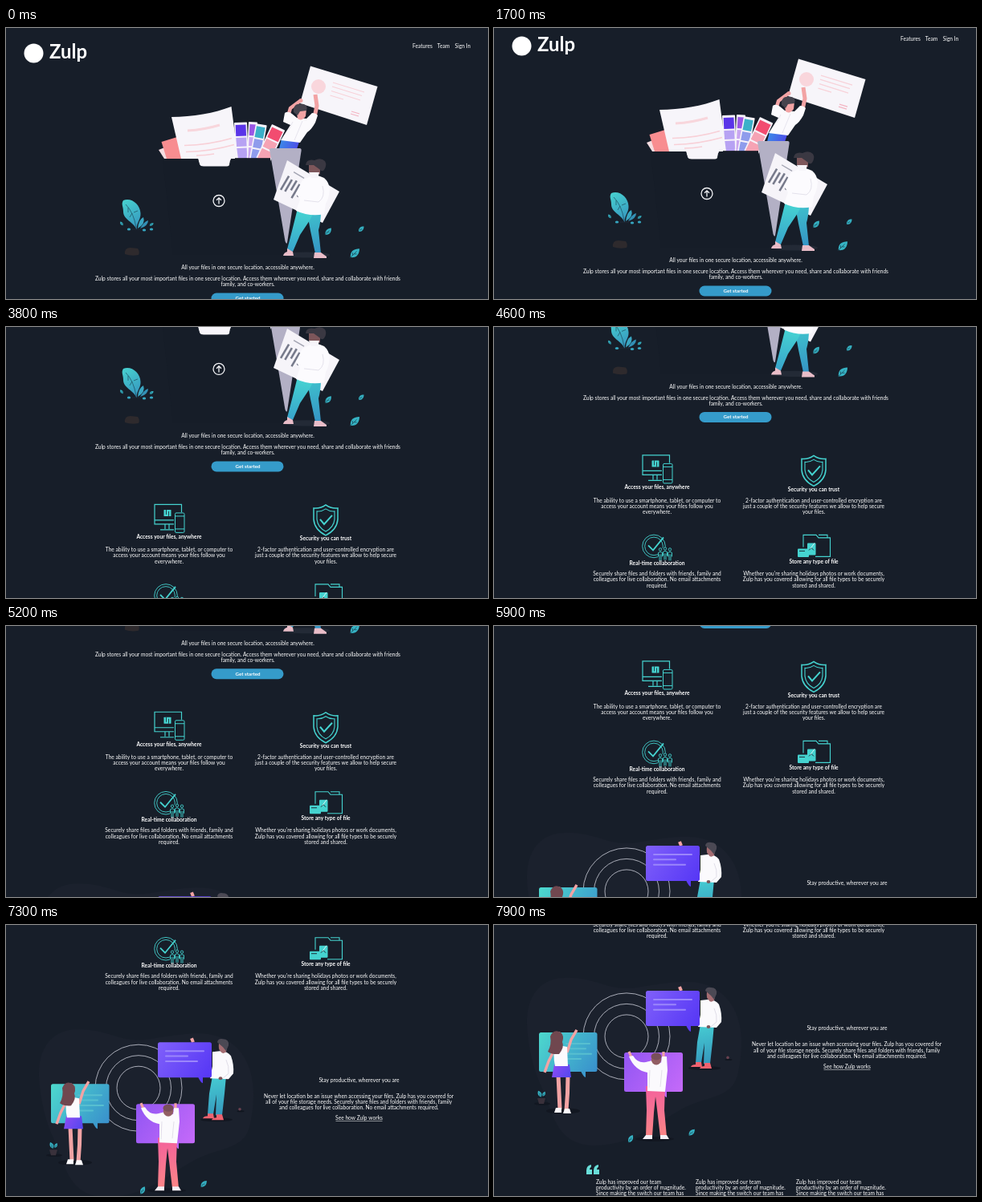
An HTML page with a canvas for the animation above (8 s loop, 600 px wide and 338 px high).

```html
<!DOCTYPE html>
<html lang="en">
<head>
<meta charset="utf-8">
<title>Zulp</title>
<style>
html, body { margin: 0; width: 100%; height: 100%; overflow: hidden; background: #171e29; }
canvas { display: block; width: 600px; height: 338px; }
</style>
</head>
<body>
<canvas id="stage" width="600" height="338"></canvas>
<script>
const ctx = document.getElementById('stage').getContext('2d');
const LOOP = 8000;
const BG = '#171e29', TEAL = '#45d3d0', SKIN = '#f2a3a4', BROWN = '#7d565a', WHITE = '#fff';

// Scroll keys: time, offset
const KEYS = [[0, 0], [1100, 0], [2000, 17], [2700, 51], [3800, 163], [4600, 224.5],
  [5900, 340.5], [6800, 417.5], [7900, 532.5], [8000, 543]];
const slope = i => (KEYS[i + 1][1] - KEYS[i][1]) / (KEYS[i + 1][0] - KEYS[i][0]);
const tangent = i => {
  if (i === 0) return 0;
  if (i === KEYS.length - 1) return slope(i - 1);
  const a = slope(i - 1), b = slope(i);
  return a * b > 0 ? 2 * a * b / (a + b) : 0;
};

function scrollAt(t) {
  let i = 0;
  while (i < KEYS.length - 2 && t >= KEYS[i + 1][0]) i++;
  const [t0, y0] = KEYS[i], [t1, y1] = KEYS[i + 1];
  const h = t1 - t0, u = (t - t0) / h, v = 1 - u;
  return y0 * (1 + 2 * u) * v * v + y1 * u * u * (3 - 2 * u) +
    h * u * v * (tangent(i) * v - tangent(i + 1) * u);
}

function fill(d, color) {
  ctx.fillStyle = color;
  ctx.fill(new Path2D(d));
}

function stroke(d, color, width = 1) {
  ctx.strokeStyle = color;
  ctx.lineWidth = width;
  ctx.stroke(new Path2D(d));
}

function oval(x, y, rx, ry, color, turn = 0) {
  ctx.beginPath();
  ctx.ellipse(x, y, rx, ry, turn, 0, 7);
  ctx.fillStyle = color;
  ctx.fill();
}

function ring(x, y, r, color, width) {
  ctx.beginPath();
  ctx.arc(x, y, r, 0, 7);
  ctx.strokeStyle = color;
  ctx.lineWidth = width;
  ctx.stroke();
}

function box(x, y, w, h, r, color) {
  ctx.beginPath();
  ctx.roundRect(x, y, w, h, r);
  ctx.fillStyle = color;
  ctx.fill();
}

function blend(x0, y0, x1, y1, ...colors) {
  const g = ctx.createLinearGradient(x0, y0, x1, y1);
  colors.forEach((c, i) => g.addColorStop(i / (colors.length - 1), c));
  return g;
}

// Set large and scaled down so that glyph advances keep their fractions
function text(str, x, y, { size = 6.64, weight = 400, align = 'center' } = {}) {
  ctx.save();
  ctx.translate(x, y);
  ctx.scale(0.1, 0.1);
  ctx.font = `${weight} ${size * 10}px Lato, "Open Sans", sans-serif`;
  ctx.textAlign = align;
  ctx.textBaseline = 'alphabetic';
  ctx.fillStyle = WHITE;
  ctx.fillText(str, 0, 0);
  ctx.restore();
}

function lines(rows, x, y, opts) {
  rows.forEach((row, i) => text(row, x, y + i * 7.2, opts));
}

function at(x, y, turn, draw) {
  ctx.save();
  ctx.translate(x, y);
  ctx.rotate(turn);
  draw();
  ctx.restore();
}

function leaf(x, y, size, turn) {
  at(x, y, turn, () => {
    ctx.scale(size, size);
    fill('M0 6C-5 2-4-3 0-7C4-3 5 2 0 6Z', '#36b3c4');
    stroke('M0 7V-3M0 3L-2 1M0 1L2-1', '#1a4656', 0.6);
  });
}

function header() {
  oval(34.5, 31.5, 12, 12, WHITE);
  text('Zulp', 54, 37.5, { size: 24, weight: 700, align: 'left' });
  [['Features', 518.5], ['Team', 544.5], ['Sign In', 568.5]].forEach(([s, x]) =>
    text(s, x, 25));
}

function swatch(x, y, turn, w, h, dark, pale) {
  at(x, y, turn, () => {
    box(0, 0, w, h, 0.8, '#f7f3fa');
    box(1.6, 3, w - 3.2, 14, 0, dark);
    box(1.6, 19, w - 3.2, 11, 0, pale);
    box(1.6, 32, w - 3.2, h - 32, 0, pale);
  });
}

function papers() {
  fill('M190 152L200 148L216 163H197Z', '#f5dde1');
  fill('M193.500 142L213 136L221 163H200Z', '#f88d90');
  swatch(284, 118, -0.04, 16, 45, '#5a34e8', '#b7a2f3');
  swatch(302, 117, 0.05, 11, 46, '#9a57e6', '#c9a6f0');
  swatch(311, 119, 0.18, 14, 45, '#3bb0c9', '#8f9cec');
  swatch(331, 120, 0.44, 18, 46, '#f24c70', '#f6a3b4');
  fill('M206 111C232 111 260 106 280.500 98L289 163L279 165L278 172Q277 173.500 275 173.500H246Q242 173.500 241 171L239 163H218Z', '#f7f5fa');
  stroke('M226 128Q246 127 266 121', '#f8d6dc', 3.2);
  stroke('M222 146.500Q252 146 281 137.500M224 154.500Q254 154 284 145.500M237 159Q248 159 259 157', '#f8d0d7', 1.5);
}

function folder() {
  fill('M195 163H239L241 170Q242 172.500 246 172.500H275Q278 172.500 278.500 169L280 163H329L348 270L347 283H208Z', '#161d28');
  stroke('M285 162.500H329', '#0f141c', 0.8);
  fill('M328 151.500Q328 150 330 150H365.500Q368 150 367.600 153L350 268Q349 270 347.500 266Z', '#b3b0c5');
  ring(265, 215.5, 7, '#f3f4f7', 1.3);
  stroke('M265 219.500V212M262 214.800L265 211.800L268 214.800', '#f3f4f7', 1.3);
}

function certificate() {
  fill('M379 47.500L462.500 73L449 121L366 94Z', '#f7f5fa');
  oval(389, 73, 9, 9, '#f9d6dc');
  stroke('M407 68L446 80M406 73L443 84.500M405 78.500L441 90M403.500 84L420 89', '#f8d2d9', 1.3);
  stroke('M430 104L440 107M429 107L439 110', '#f3b4c2', 1.3);
}

function climber() {
  ctx.lineJoin = 'round';
  stroke('M350 114L354 100L366 91', SKIN, 4.5);
  stroke('M384 111L387 97L385 83', SKIN, 5);
  oval(367, 90.5, 2.5, 2.5, SKIN);
  fill('M343 138L365 142L362 151H340Z', blend(340, 140, 365, 150, '#3a8ee8', '#4f49e8'));
  fill('M347 106Q351 103 356 107L362 112L374 113L381 106Q386 106 388 109L385 118Q380 127 375 130L366 143L342 140L354 121L345 117Z', '#fbfafd');
  stroke('M369 116L359 140M357 117L352 127', '#d9d6e3', 0.6);
  fill('M361 101H374L373 110Q368 117 363 113Z', SKIN);
  fill('M358 105C357 97 362 94 367 95C373 94 376 98 374 103L366 104L363 109Z', '#46444e');
  ctx.lineJoin = 'miter';
}

function carrier() {
  oval(374, 283, 29, 3.6, '#232a36');
  fill('M350 165L415 204L394 243L333 214Z', '#f6f4f9');
  at(351, 184, 0.53, () => {
    for (let i = 0; i < 5; i++) box(i * 5.6, i % 2 * 2, 2.6, 20 - i % 3 * 3, 0, '#777a8b');
    box(4, -8, 15, 1.4, 0, '#a2a3b1');
  });
  fill('M374 226L392 228Q392 242 389 252L392 281H385L379 253Z', blend(380, 226, 390, 282, '#3fc3cd', '#3593c4'));
  fill('M363 225L384 228L378 240L366 258L357 279L350 276L356 253Z', blend(360, 226, 352, 280, '#46d3d2', '#37a3cb'));
  fill('M350 275L357 279L358 284H345Q346 280 350 279Z', '#e9bdc8');
  fill('M384 280H392L399 285V287H383Z', '#e9bdc8');
  fill('M379 185Q385 182 391 185L396 187Q402 192 403 201Q402 213 398 219L396 232Q379 236 361 228L366 214L361 206L369 190Z', '#fcfbfe');
  stroke('M394 197Q398 211 389 217L371 215', '#dedbe6', 0.8);
  fill('M377 170L391 168L391 182Q384 187 377 180Z', BROWN);
  fill('M373 171Q374 163 384 165Q392 161 397 166Q400 171 396 177Q393 180 390 176L383 171Z', '#3a3842');
  fill('M377 180L390 180L388 187L380 187Z', '#f7f5fa');
}

function plants() {
  oval(163, 251, 12, 1, '#1c2430');
  fill('M146 215C156 211 167 220 167.500 231C168 239 163 241 162.500 251C159 242 146 239 146 229C146 222 143 220 146 215Z', blend(145, 215, 168, 250, '#48d2d0', '#3491bd'));
  stroke('M149 220Q159 230 162 249M152 224L152 230M157 231L154 236M159 230L164 228', '#173a4b', 0.6);
  fill('M164 250Q165 239 171 236Q174 244 164 250Z', '#3aa6c2');
  fill('M167 250Q172 241 177 240Q177 247 167 250Z', '#3390b5');
  [[153, 251], [172, 252], [181, 251]].forEach(([x, y]) => oval(x, y, 2.2, 1.5, '#36a7c1'));
  leaf(181, 245, 0.45, 1);
  leaf(144, 244, 0.45, -0.6);
  fill('M148 282Q147 274 155 274L164 275Q167 279 165 283Q156 285 148 282Z', '#2e2a2d');
  leaf(401, 254, 0.85, 0.7);
  leaf(442, 251, 0.7, 0.8);
  leaf(434, 281, 1.2, 0.8);
}

function hero() {
  papers();
  certificate();
  climber();
  folder();
  carrier();
  plants();
  text('All your files in one secure location, accessible anywhere.', 301, 301.3);
  lines(['Zulp stores all your most important files in one secure location. Access them wherever you need, share and collaborate with friends',
    'family, and co-workers.'], 301, 315.2);
  box(255.5, 330.5, 90, 13, 6.5, '#359bca');
  text('Get started', 301, 339, { size: 6.2, weight: 700 });
}

function deviceIcon() {
  stroke('M209 409H185V384.500H218.500V394M185 404H209M198 409V415M203 409V415M192 416H209', TEAL, 1.2);
  box(196.5, 391, 9, 8, 0.5, TEAL);
  stroke('M199.500 391L199.500 397M202.500 393V399', BG, 0.8);
  stroke('M212 395H220.500Q222 395 222 396.500V418Q222 419.500 220.500 419.500H212Q210.500 419.500 210.500 418V396.500Q210.500 395 212 395ZM210.500 399H222M210.500 415H222', TEAL, 1);
}

function shieldIcon() {
  at(398, 385, 0, () => {
    stroke('M0 0Q7 5 15 4V18Q14 31 0 38Q-14 31 -15 18V4Q-7 5 0 0Z', TEAL, 1.5);
    stroke('M0 5Q5 8.500 11 8V18Q10 28 0 33Q-10 28 -11 18V8Q-5 8.500 0 5Z', TEAL, 1.1);
    stroke('M-7 18L-2 24L8 13', TEAL, 2);
  });
}

function teamIcon() {
  ring(199, 498, 14.3, TEAL, 0.9);
  ring(199, 498, 11.3, TEAL, 0.9);
  stroke('M192 497L198 503L211 487', TEAL, 1.8);
  [207, 213, 219].forEach((x, i) => {
    const y = 503 - i % 2;
    box(x - 3, y - 3, 6.5, 15, 2, BG);
    ring(x, y - 1, 1.7, TEAL, 0.9);
    stroke(`M${x - 2.5} ${y + 8}V${y + 3}Q${x} ${y + 1} ${x + 2.5} ${y + 3}V${y + 8}M${x - 1} ${y + 5}V${y + 13}M${x + 1} ${y + 5}V${y + 13}`, TEAL, 0.9);
  });
}

function filesIcon() {
  stroke('M385 499V484H401L404 487.500H418.500V511H400M404 484H415V487', TEAL, 1.1);
  box(378, 501, 14, 10.5, 1, TEAL);
  box(390, 494, 10.5, 15, 1, TEAL);
  stroke('M392 503L395 500L398 503M380 504H387', BG, 0.9);
  stroke('M394 501L399 494', WHITE, 0.8);
}

function features() {
  const items = [
    [deviceIcon, 'Access your files, anywhere', 203, 427, 443.3,
      ['The ability to use a smartphone, tablet, or computer to', 'access your account means your files follow you', 'everywhere.']],
    [shieldIcon, 'Security you can trust', 398, 429.3, 443.3,
      ['2-factor authentication and user-controlled encryption are', 'just a couple of the security features we allow to help secure', 'your files.']],
    [teamIcon, 'Real-time collaboration', 203, 521.3, 534.7,
      ['Securely share files and folders with friends, family and', 'colleagues for live collaboration. No email attachments', 'required.']],
    [filesIcon, 'Store any type of file', 398, 519.7, 534.7,
      ["Whether you're sharing holidays photos or work documents,", 'Zulp has you covered allowing for all file types to be securely', 'stored and shared.']]
  ];
  for (const [icon, title, x, y, bodyY, body] of items) {
    icon();
    text(title, x, y, { weight: 700 });
    lines(body, x, bodyY);
  }
}

function bubble(x, y, w, h, tail, a, b) {
  const paint = blend(x, y, x + w, y + h, a, b);
  box(x, y, w, h, 2.5, paint);
  fill(`M${tail} ${y + h - 1}h6v8q-3 -1 -6 -8Z`, paint);
}

function rows(x, y, widths, color) {
  widths.forEach((w, i) => box(x, y + i * 6.4, w, 2, 1, color));
}

function helper() {
  oval(262, 178.500, 20, 2.5, '#121721');
  fill('M257 124H274L272 146L269 173H261L262 147L258 172H251L253 146Z', blend(255, 125, 266, 174, '#46ccd2', '#3597bd'));
  fill('M251 171H258L259 177H245Q246 174 251 174Z', '#f0626f');
  fill('M262 172H269L271 179H256Q257 176 262 176Z', '#f0626f');
  fill('M257 94L266 93Q276 93 280 99Q284 110 283 121L277 128L254 127L257 112Z', '#fbfafd');
  stroke('M274 104Q278 112 277 121L270 127', '#d8d6e2', 0.8);
  oval(267, 127, 2.4, 2, BROWN);
  fill('M265 83H276L274 94Q269 98 267 93Q264 92 265 83Z', '#a56d72');
  fill('M263 82Q264 77 270 78Q278 78 277 86L274 93L270 88Z', '#4b4954');
}

function waver() {
  oval(86, 232, 21, 3.6, '#121721');
  stroke('M91 159L96 143L103 131M74 158L68 170L63 184', SKIN, 3.4);
  stroke('M80 188L82 230M92 188Q92 210 90 231', SKIN, 5);
  fill('M77 228H84V234H75ZM88 229H94L96 235H86Z', '#fbfafd');
  fill('M75 174H94L96 190H72Z', blend(73, 176, 96, 190, '#8d4bf4', '#5147ee'));
  fill('M76 149L91 152L92 176H76Q73 163 76 149Z', '#fbfafd');
  oval(80, 140, 5.5, 7, SKIN);
  fill('M70 139Q74 129 83 134Q88 138 85 146Q88 152 81 161Q73 162 67 158Q72 149 70 139Z', '#70474f');
}

function presenter() {
  oval(200, 267, 24, 3, '#121721');
  fill('M189 201H213L212 231L215 264H207L203 230L201 214L199 234L197 264H189L190 231Z', blend(196, 202, 202, 264, '#f4619c', '#fa8586'));
  fill('M189 262H197V267H185ZM207 262H215L218 267H207Z', '#f4f0f6');
  stroke('M171 165L168 158M211 168L211 158', SKIN, 3.2);
  fill('M168 164L173 163Q179 173 189 171L201 168L208 172L209 164L215 164L216 181L213 208L191 207L191 184Q175 181 168 164Z', '#fbfafd');
  stroke('M194 181L193 203M209 181L207 202', '#dcd9e4', 0.8);
  oval(202, 168, 6.2, 6.5, '#925e63');
  oval(202, 164, 6.5, 4.5, '#79505a');
}

function productive() {
  fill('M41 124C40 83 63 66 88 66C128 65 142 84 179 78C219 72 252 64 279 82C312 105 312 151 303 188C295 217 263 213 233 230C200 248 175 274 126 275C77 275 74 235 60 204C49 181 42 151 41 124Z', '#1b212d');
  [27, 40.5, 54].forEach(r => ring(165, 139, r, '#b9bcc7', 0.9));
  stroke('M233 82L231 77', SKIN, 4);
  helper();
  bubble(189, 82, 67, 44, 239, '#8060fa', '#5536f5');
  rows(198, 92, [49, 29, 41], '#9b86fb');
  bubble(56, 134, 72.500, 49, 108, '#4dd9cd', '#398fcc');
  rows(89, 147, [31, 26, 33, 20], '#57bfd0');
  bubble(162, 159, 73, 49, 209, '#9256f3', '#c56af9');
  waver();
  presenter();
  oval(60, 223, 10, 1.8, '#121721');
  fill('M54 216H64L62 223H56Z', '#39313b');
  leaf(57, 211, 0.65, -0.45);
  leaf(62, 211, 0.5, 0.45);
  leaf(170, 267, 0.8, 0.5);
  leaf(246, 259, 0.8, 0.75);
  oval(292, 168, 4.5, 1, '#10151e');
  oval(291, 165.500, 1.8, 1.8, '#69414f');
  text('Stay productive, wherever you are', 439.5, 131.3, { size: 6.7 });
  lines(['Never let location be an issue when accessing your files. Zulp has you covered for',
    'all of your file storage needs. Securely share files and folders with friends, family',
    'and colleagues for live collaboration. No email attachments required.'], 439.2, 151.6);
  text('See how Zulp works', 439.5, 179.2);
  box(410.500, 180.3, 58, 0.6, 0, WHITE);
}

function quotes() {
  [115, 124].forEach(x => fill(`M${x} 311V306Q${x} 300 ${x + 6} 299V301.500Q${x + 4} 303 ${x + 4} 305H${x + 7}V311Z`, '#69dfd9'));
  [127, 251, 376].forEach(x => lines(['Zulp has improved our team', 'productivity by an order of magnitude.',
    'Since making the switch our team has', 'become a well-oiled collaboration', 'machine.'], x, 323.2, { align: 'left' }));
}

function frame(now) {
  ctx.setTransform(1, 0, 0, 1, 0, 0);
  ctx.fillStyle = BG;
  ctx.fillRect(0, 0, 600, 338);
  ctx.translate(0, -scrollAt(now % LOOP));
  header();
  hero();
  features();
  ctx.translate(0, 532.5);
  productive();
  quotes();
  requestAnimationFrame(frame);
}
requestAnimationFrame(frame);
</script>
</body>
</html>
```
